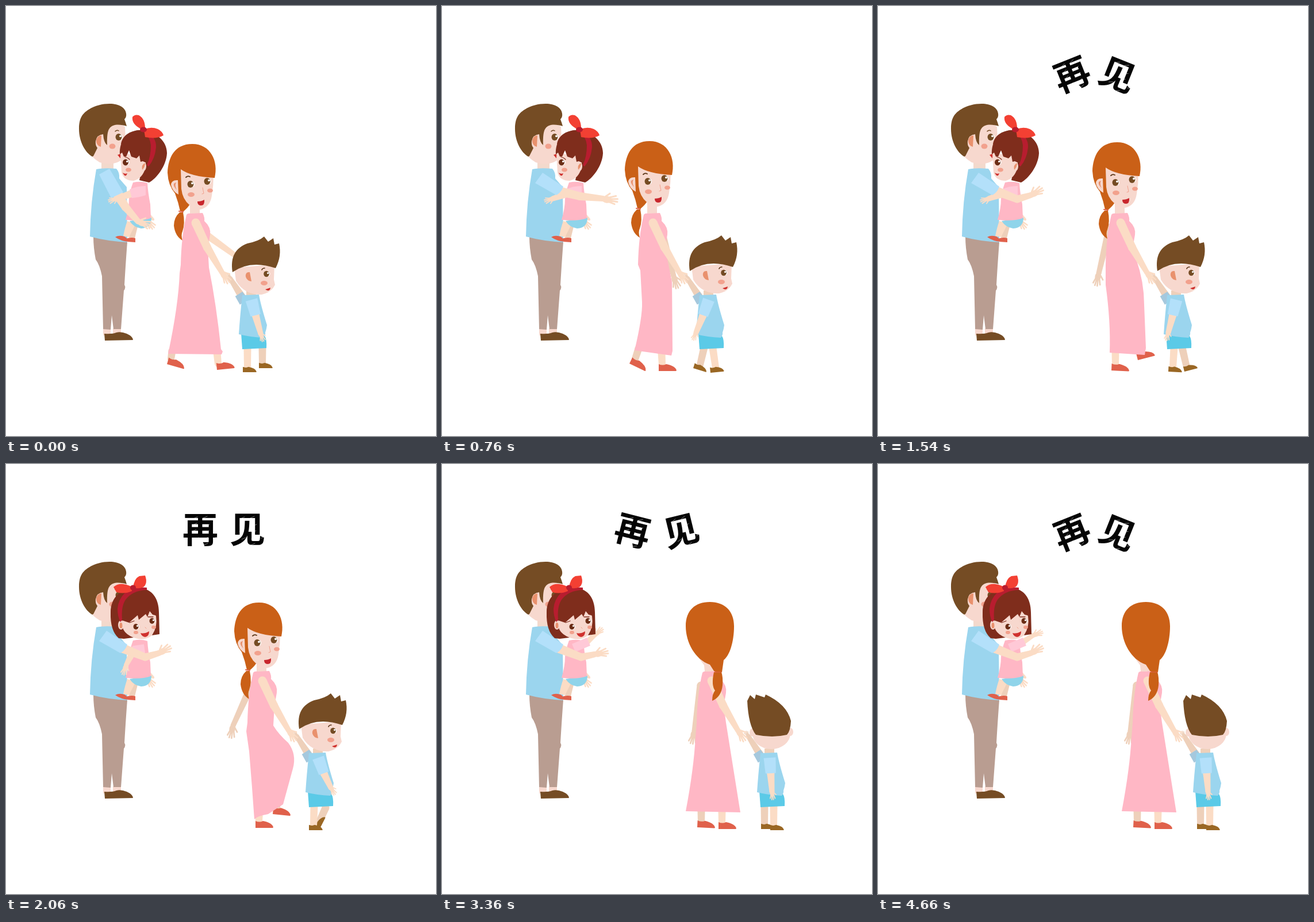
These frames come from a looping animation (748x748 px, 4.92 s). An HTML page with a canvas:

```html
<!DOCTYPE html>
<html lang="zh">
<head>
<meta charset="utf-8">
<title>再见</title>
<style>
html, body { margin: 0; width: 100%; height: 100%; overflow: hidden; background: #fff; }
canvas { display: block; }
</style>
</head>
<body>
<canvas id="stage" width="748" height="748"></canvas>
<script>
const g = document.getElementById('stage').getContext('2d');

const SKIN = '#f7d8ce', PEACH = '#fbdcc5', SHADE = '#eed0ba', BROWN = '#754c24', BLUE = '#9bd5ee',
  SLEEVE = '#b3e0fa', PINK = '#ffb7c5', ROSE = '#ffc9d7', CORAL = '#e0614b', RED = '#f34033',
  CRIMSON = '#b81d2f', MAROON = '#7f2d1c', GINGER = '#ca6017', EAR = '#e9916d', CHEEK = '#f2a18d',
  MOUTH = '#d0322f', CYAN = '#5bcae7', TAN = '#9a6724';

// ---- drawing helpers ----
function fill(color, d) {
  g.fillStyle = color;
  g.fill(new Path2D(d));
}
function line(color, w, d) {
  g.strokeStyle = color;
  g.lineWidth = w;
  g.lineCap = 'round';
  g.stroke(new Path2D(d));
}
function oval(color, x, y, rx, ry = rx) {
  g.fillStyle = color;
  g.beginPath();
  g.ellipse(x, y, rx, ry, 0, 0, 7);
  g.fill();
}
function at(x, y, angle, scale, draw) {
  g.save();
  g.translate(x, y);
  g.rotate(angle);
  g.scale(scale, scale);
  draw();
  g.restore();
}
function limb(color, x0, y0, w0, x1, y1, w1, round = true) {
  const a = Math.atan2(y1 - y0, x1 - x0), s = Math.sin(a) / 2, c = Math.cos(a) / 2;
  fill(color, `M${x0 - s * w0} ${y0 + c * w0}L${x0 + s * w0} ${y0 - c * w0}` +
    `L${x1 + s * w1} ${y1 - c * w1}L${x1 - s * w1} ${y1 + c * w1}Z`);
  if (round) {
    oval(color, x0, y0, w0 / 2);
    oval(color, x1, y1, w1 / 2);
  }
}
function hand(color, x, y, angle, scale = 1) {
  at(x, y, angle, scale, () => {
    oval(color, 6, 0, 8, 5.5);
    line(color, 2.8, 'M8 -3L20 -7M10 -1L23 -2.5M10 1L23 2M9 3L19 6M3 -4L10 -10');
  });
}
function shoe(color, x, y, angle, scale = 1) {
  at(x, y, angle, scale, () => fill(color, 'M0 -12Q7 -9 13 -12Q29 -9 31 -1L30 0L0 0Z'));
}
function eye(x, y, r, color = BROWN) {
  oval('#fff', x + 1.5, y, r, r);
  oval(color, x, y, r, r + .4);
  oval('#fff', x + r * .55, y - r * .3, r * .35);
}

// ---- father and daughter ----
function father() {
  fill('#f3d9cc', 'M166 268H187V288H166Z');
  fill(SKIN, 'M152 222L176 208Q195 200 207 210L208 235Q206 250 204 262C200 275 178 277 163 272Q150 264 148 258Z');
  fill(BROWN, 'M150 262C138 255 127 236 127 214C127 195 133 187 144 180C155 173 168 170 180 170C197 170 208 177 209 187Q210 193 206 197Q208 202 210 209C200 206 186 204 180 213Q175 219 176 242Q170 238 169 223Q158 224 156 235Q155 242 159 247L152 261Z');
  fill(EAR, 'M166 225Q157 226 157 236Q158 243 165 245Z');
  line(BROWN, 1.5, 'M190 218Q193 215 196 217');
  eye(196, 228, 5.5);
  oval(CHEEK, 185, 244, 5.5, 4.5);
  fill(MOUTH, 'M194 259L200 257L199 265Z');
  fill(SKIN, 'M169 561H182V573H169ZM186 561H200V573H186Z');
  fill('#b99d91', 'M152 402L211 410Q208 450 206 485Q209 490 205 495L200 562L187 562L184 538L182 563L169 562L167 470Q163 450 156 441Q152 420 152 402Z');
  fill(BROWN, 'M171 570Q185 571 192 568Q200 566 210 570Q221 575 221 581L172 582Z');
  fill(BLUE, 'M157 284Q170 281 192 283Q198 290 197 300L210 315L211 411Q175 409 146 401Q147 340 157 284Z');
}

function girlBody() {
  hand(PEACH, 244, 370, .95, .9);
  line(PEACH, 4, 'M250 364L256 371');
  fill(SHADE, 'M220 380L229 384L224 404L214 403Z');
  fill(PEACH, 'M211 374L226 378L214 402L204 400Q207 385 211 374Z');
  fill(CORAL, 'M190 402Q196 398 206 401Q212 404 213 410Q200 409 190 402ZM211 404Q220 402 225 404L225 411L211 410Z');
  fill('#8fd4ea', 'M215 374L253 368Q253 386 235 387Q222 385 215 374Z');
  fill(PINK, 'M221 307Q235 304 246 308Q247 325 251 345L252 369Q235 375 208 372Q214 352 214 335Q216 320 221 307Z');
}

function girlFacingLeft() {
  fill(MAROON, 'M200 240C203 222 222 215 236 216C262 219 280 235 280 256C279 278 262 300 249 307L232 303L240 265Z');
  fill(SKIN, 'M199 255L243 262L243 280Q238 300 222 304Q205 304 201 290Z');
  fill(MAROON, 'M198 258C197 235 210 216 236 216L252 225Q256 245 246 272L242 272L238 270L234 271L232 260L227 265L218 262L214 251L209 262L205 262L202 255Z');
  fill(CRIMSON, 'M240 216Q262 226 261 246Q259 266 248 279L245 277Q252 262 252 242Q250 226 238 218Z');
  oval(SKIN, 239, 279, 5, 8);
  fill(EAR, 'M242 273Q235 276 237 285Q242 280 242 273Z');
  line(MAROON, 1.2, 'M207 263Q211 263 215 267');
  eye(208, 272, 5, '#6b2d16');
  oval(CHEEK, 213, 285, 5, 3.5);
  fill(MOUTH, 'M203 290Q207 293 211 291Q208 300 203 290Z');
  fill(RED, 'M237 215Q218 206 220 193Q224 188 231 190Q242 196 242 213ZM240 215Q252 209 264 214Q272 218 274 225Q262 232 242 228Z');
  oval(CRIMSON, 239, 215, 6, 4.5);
}

function girlFacingRight() {
  fill(MAROON, 'M182 258C182 232 200 216 226 215C252 214 266 232 266 258L267 296L254 298L205 304L196 303Q181 290 182 258Z');
  oval(SKIN, 200, 280, 5, 8);
  oval(EAR, 200, 281, 2.5, 5);
  fill(SKIN, 'M202 262L257 255L261 265Q264 283 254 298Q242 308 225 303Q207 297 203 285Z');
  fill(MAROON, 'M193 258Q205 215 235 222Q262 230 263 264L255 262L250 256L246 266L243 261L231 271L229 263L214 276L202 272Z');
  fill(CRIMSON, 'M245 215Q222 212 207 224Q195 236 194 252Q194 265 199 275L202 271Q200 248 208 236Q220 220 245 219Z');
  line(MAROON, 1.3, 'M215 276L223 273M247 266L256 266');
  eye(226, 283, 4.5, '#6b2d16');
  eye(254, 273, 4.5, '#6b2d16');
  oval(CHEEK, 226, 293, 4, 3);
  oval(CHEEK, 257, 284, 4, 3);
  line(CHEEK, 1, 'M242 284L244 286');
  fill(MOUTH, 'M234 294Q241 296 249 291Q249 300 242 301Q236 300 234 294Z');
  fill(RED, 'M187 214Q198 204 218 213L219 221Q206 227 192 223ZM221 215Q223 199 232 195L242 194Q247 208 239 214Q231 218 221 215Z');
  oval(CRIMSON, 221, 215, 5, 4.5);
}

function fatherArm(k) {
  if (k == 0) {
    limb(PEACH, 195, 329, 17, 208, 350, 14);
    limb(PEACH, 208, 350, 14, 230, 375, 10);
    hand(PEACH, 230, 375, .35);
    fill(SLEEVE, 'M162 293L180 283L204 324L183 334Z');
    return;
  }
  if (k < 3) {
    limb(PEACH, 204, 322, 16, 240, 331, 14);
    limb(PEACH, 240, 331, 14, 280, 335, 10);
    hand(PEACH, 280, 336, .1, 1.1);
  } else {
    const level = k == 9 || k >= 10 && k % 2 == 0;
    limb(PEACH, 204, 321, 16, 242, 336, 13);
    limb(PEACH, 242, 336, 13, 266, level ? 331 : 329, 10);
    hand(PEACH, 266, level ? 331 : 329, level ? -.15 : -.45);
  }
  fill(SLEEVE, 'M175 290L211 314Q208 324 199 329L162 308Z');
}

function girlArmLeft() {
  limb(PEACH, 219, 326, 13, 193, 335, 9);
  hand(PEACH, 194, 335, 2.9, .7);
  fill(ROSE, 'M215 319Q228 313 243 313L243 329Q232 333 219 334Z');
}

function girlArmRight(k) {
  if (k == 7) {
    limb(PEACH, 222, 324, 13, 209, 350, 8);
    hand(PEACH, 209, 350, 1.9, .75);
    limb(ROSE, 241, 321, 15, 221, 324, 15, false);
    return;
  }
  const lift = k < 11 ? 0 : [2, 1, 0, 1][k % 4];
  const [x, y, angle] = [[272, 321, -.15], [270, 298, -.3], [266, 297, -.65]][lift];
  const ex = 255, ey = lift ? 309 : 322;
  limb(PEACH, ex - 2, ey, 10, x, y, 8);
  hand(PEACH, x, y, angle, lift ? .75 : .95);
  limb(ROSE, 229, 320, 15, ex, ey, 15, false);
}

// ---- mother and son, placed by walking offset ----
// Each leg: top x, y, ankle x, y, then shoe x, y, angle.
const poses = [
  { head: 0, arm: [400, 435], hem: 'L353 455Q366 520 374 597L377 601L375 606L282 605Q300 520 302 465Z',
    legs: [[289, 600, 287, 614, 280, 623, .28], [367, 603, 369, 622, 367, 633, -.1]],
    boyHand: [443, 570], boyLegs: [[446, 594, 446, 622, 440, 630, 0], [420, 595, 420, 629, 412, 637, 0]] },
  { head: -5, arm: [366, 470], hem: 'L363 480L364 600L362 608L298 599Q312 540 311 515L308 460Z',
    legs: [[305, 596, 299, 614, 289, 622, .45], [345, 604, 346, 624, 340, 635, 0]],
    boyHand: [405, 568], boyLegs: [[419, 594, 412, 624, 400, 630, .3], [434, 595, 439, 629, 430, 638, -.1]] },
  { head: -3, arm: [292, 465], hem: 'L357 440Q371 480 371 520L374 595L372 607L311 603Q313 550 304 485Z',
    legs: [[365, 596, 366, 605, 360, 616, -.25], [321, 602, 321, 623, 314, 634, .05]],
    boyHand: [413, 568], boyLegs: [[437, 594, 444, 624, 441, 636, -.25], [423, 595, 421, 628, 413, 636, .05]] },
  { head: 1, arm: [279, 455], hem: 'L349 455Q358 470 375 485Q390 505 383 530L366 592L340 609Q322 612 316 618Q312 560 307 500L302 465Z',
    legs: [[355, 588, 355, 601, 348, 609, .1], [324, 612, 324, 624, 318, 633, 0]],
    boyHand: [449, 563], boyLegs: [[440, 598, 430, 620, 429, 636, -1.1], [420, 595, 419, 628, 411, 637, 0]] },
  { head: -1, arm: [292, 465], hem: 'L358 440Q371 490 372 530L374 597Q358 605 342 608L301 602Q303 540 302 475Z',
    legs: [[321, 603, 321, 625, 314, 635, 0], [357, 602, 357, 625, 350, 635, 0]],
    boyHand: [434, 570], boyLegs: [[436, 594, 435, 627, 429, 635, 0], [421, 594, 420, 627, 412, 635, 0]] },
  { head: 0, arm: [300, 465], hem: 'L355 450L379 600L380 606L285 604Q299 530 302 475Z',
    legs: [[312, 603, 312, 623, 305, 632, .05], [348, 603, 348, 625, 342, 635, 0]],
    boyHand: [431, 570], boyLegs: [[418, 594, 418, 628, 412, 635, 0], [434, 594, 434, 628, 428, 637, 0]], back: true }
];
const poseOf = [0, 1, 1, 2, 2, 2, 3, 3, 4, 4, 5];
const walked = [0, 21, 37, 51, 67, 92, 103, 116, 121, 126, 139];

function legs(list, w, color, scale) {
  list.forEach(([x0, y0, x1, y1, sx, sy, angle], i) => {
    limb(i ? PEACH : SHADE, x0, y0, w, x1, y1, w - 1);
    shoe(color, sx, sy, angle, scale);
  });
}

function motherBackArm({ arm: [x, y] }) {
  const start = x > 340 ? 346 : 311, tone = x > 390 ? PEACH : SHADE;
  limb(tone, start, start > 340 ? 396 : 385, 13, x, y, 9);
  if (x < 390) hand(tone, x, y, x > 340 ? 1.3 : 1.8, .95);
}

function motherHead() {
  fill(SKIN, 'M304 280L361 294Q361 312 358 330Q355 350 338 354Q325 351 318 346Q306 335 302 318Z');
  fill(GINGER, 'M304 284Q322 297 363 299C370 270 356 240 324 240C293 240 282 264 281 290Q282 312 294 326Q300 342 303 357L309 357Q317 350 319 346Q307 336 305 318Z');
  fill(GINGER, 'M302 359Q292 368 292 382Q294 400 307 408Q304 398 307 392Q312 378 308 359Z');
  line(CORAL, 2, 'M301 357L308 358');
  fill(SKIN, 'M299 303Q288 302 287 311Q289 322 300 328Z');
  fill(EAR, 'M296 307Q287 309 297 320Q293 312 296 307Z');
  line('#5a3517', 1.8, 'M313 298Q316 295 320 297');
  eye(321, 310, 5.5);
  eye(350, 305, 5.5);
  oval(CHEEK, 322, 328, 6, 4);
  oval(CHEEK, 355, 321, 5, 3.5);
  line(CHEEK, 1, 'M342 316L344 326L341 327');
  fill('#c8262d', 'M333 340Q340 340 345 337Q346 347 339 347Q333 347 333 340Z');
}

function mother(pose) {
  legs(pose.legs, 13, CORAL, 1);
  fill(SKIN, 'M320 342H337V365H320Z');
  if (!pose.back) at(0, pose.head, 0, 1, motherHead);
  fill(PINK, 'M304 450Q305 400 314 363Q316 360 322 361L342 360Q346 368 345 374Q357 385 355 398Q353 410 351 420' + pose.hem);
  limb(PEACH, 330, 377, 15, 350, 420, 14);
  limb(PEACH, 350, 420, 14, 376, 464, 9);
  hand(PEACH, 376, 463, 1.05, .95);
  if (pose.back) at(-139, 0, 0, 1, () => {
    fill(SKIN, 'M444 334Q455 346 474 350L468 361L457 361L456 350Z');
    fill(GINGER, 'M424 282C424 255 440 240 466 240C492 240 508 256 508 282C508 310 500 334 490 341L487 362Q481 366 473 360L466 349C440 340 424 310 424 282Z');
    fill(GINGER, 'M473 362Q468 385 475 394Q470 400 470 412Q486 405 488 385Q489 370 486 362Z');
    line(CORAL, 1, 'M474 362H486');
  });
}

function sonHead() {
  fill(SKIN, 'M397 455L467 450L466 476L468 485L465 490Q458 499 445 502Q415 503 400 478Z');
  fill(BROWN, 'M394 463C390 436 399 421 420 413Q440 409 449 401L456 410L465 404L467 415L475 413Q480 435 469 456Q425 441 394 463Z');
  fill(EAR, 'M424 463Q416 462 417 471Q419 478 427 479Z');
  line('#5a3517', 1.6, 'M445 459Q446 456 450 456');
  eye(453, 466, 4.8);
  oval(CHEEK, 449, 482, 6, 4);
  fill(MOUTH, 'M451 493L460 490Q459 498 451 493Z');
}

function son(pose) {
  limb(SHADE, 410, 505, 13, 390, 474, 8);
  hand(SHADE, 391, 475, -2.1, .5);
  limb('#a5c8dd', 414, 515, 17, 405, 501, 15, false);
  legs(pose.boyLegs, 13, TAN, .77);
  fill(CYAN, 'M409 569L450 574Q454 580 453 595L411 597Z');
  fill(SHADE, 'M418 495H435V508H418Z');
  fill(BLUE, 'M411 503L440 502Q443 520 454 555Q453 563 451 568Q452 572 448 577Q425 576 405 571Q407 540 411 503Z');
  if (pose.back) at(-143, 0, 0, 1, () => {
    oval(SKIN, 573, 469, 33, 27);
    oval(SKIN, 606, 466, 5, 7);
    oval(SKIN, 540, 467, 5, 7);
    fill(BROWN, 'M531 412L536 402L544 409L546 401L561 406L563 401Q600 418 607 447Q606 465 600 471Q575 477 546 471Q533 455 531 412Z');
  });
  else at(0, pose.head ? -2 : 0, 0, 1, sonHead);
  const [x, y] = pose.boyHand, ex = 427 + (x - 427) * .45, ey = 538;
  limb(PEACH, ex, ey, 13, x, y, 9);
  hand(PEACH, x, y - 1, Math.atan2(y - ey, x - ex), .65);
  limb(SLEEVE, 427, 511, 21, ex, ey, 18, false);
}

// ---- lettering: [x, y, angle] of both characters for each wobble step ----
const wobble = [
  [[332, 116, .25], [416, 116, -.24]],
  [[338, 114, 0], [420, 114, 0]],
  [[337, 119, -.38], [417, 120, .38]]
];

function lettering(k) {
  wobble[k % 3].forEach(([x, y, angle], i) => at(x, y, angle, 1, () => {
    g.fillStyle = '#050505';
    g.font = '700 62px "Noto Sans CJK SC", "Noto Sans CJK", sans-serif';
    g.textAlign = 'center';
    g.fillText('再见'[i], 0, 23);
    g.globalAlpha = .55;
    for (let n = 0; n < 16; n++) {
      const sx = n * 37 % 56 - 28, sy = n * 23 % 58 - 29;
      line('#fff', .8, `M${sx} ${sy}l7 -3`);
    }
    g.globalAlpha = 1;
  }));
}

function draw(k) {
  g.fillStyle = '#fff';
  g.fillRect(0, 0, 748, 748);
  if (k > 2) lettering(k);

  father();
  girlBody();
  if (k < 7) {
    girlFacingLeft();
    if (k) girlArmLeft();
    fatherArm(k);
    if (!k) girlArmLeft();
  } else {
    girlArmRight(k);
    fatherArm(k);
    girlFacingRight();
  }

  const step = Math.min(k, 10), pose = poses[poseOf[step]], x = walked[step];
  at(x, 0, 0, 1, () => motherBackArm(pose));
  at(x + (pose.back ? 4 : 0), 0, 0, 1, () => son(pose));
  at(x, 0, 0, 1, () => mother(pose));
}

function tick() {
  const t = performance.now() % 4920;
  draw(t < 500 ? 0 : 1 + Math.floor((t - 500) / 260));
  requestAnimationFrame(tick);
}
tick();
</script>
</body>
</html>
```
